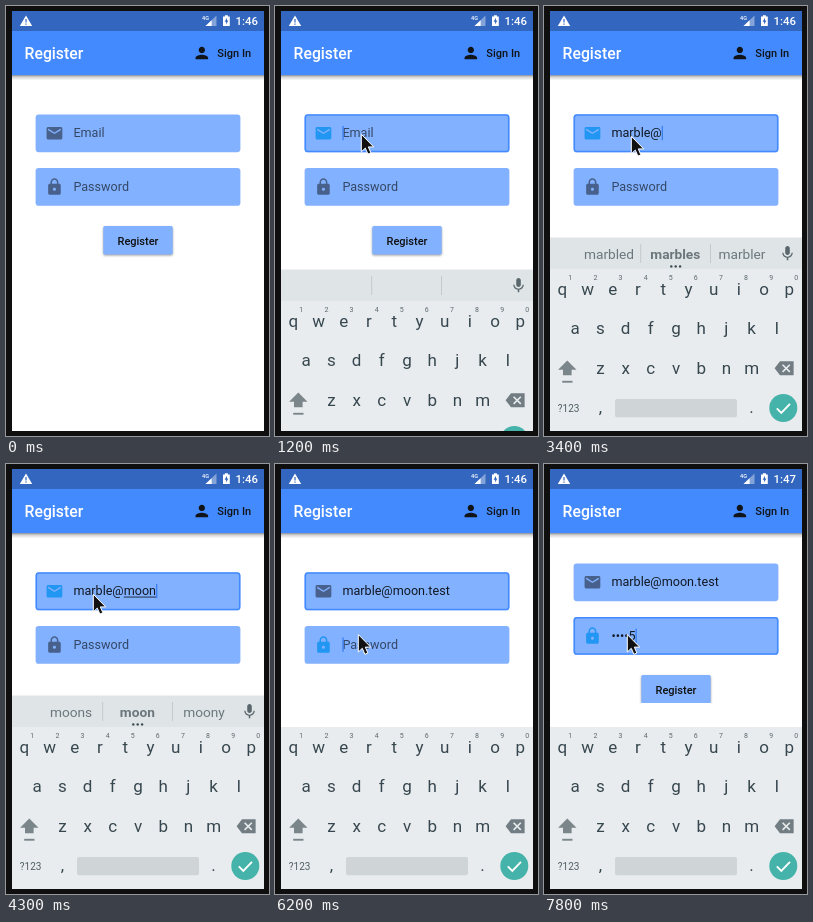
An HTML page for the animation above (8000 ms loop, 263x430 px).

```html
<!DOCTYPE html>
<html lang="en">
<head>
<meta charset="utf-8">
<title>Register form</title>
<style>
html, body { margin: 0; width: 100%; height: 100%; overflow: hidden; background: #100f10; }
svg { display: block; width: 100vw; height: 100vh; font-family: Roboto, "Noto Sans", sans-serif; }
text { white-space: pre; }
.m { font-weight: 500; }
.label { font-size: 12.6px; fill: #000; fill-opacity: .6; }
.typed { font-size: 12.6px; fill: #000; fill-opacity: .87; }
.box { fill: #82b1ff; }
.focus { fill: none; stroke: #448aff; stroke-width: 1.5; }
.caret { fill: #3b7ff0; }
.button { filter: drop-shadow(0 1.3px 1.1px rgba(0,0,0,.38)); }
.key { font-size: 17px; fill: #37474f; text-anchor: middle; }
.digit { font-size: 7px; fill: #5c686e; text-anchor: middle; }
.hint { font-size: 13.7px; fill: #6b777d; text-anchor: middle; }
</style>
</head>
<body>
<svg viewBox="0 0 263 430">
  <defs>
    <clipPath id="screen"><rect x="6" y="5" width="252" height="420"/></clipPath>
    <clipPath id="view"><rect id="viewRect" x="6" y="69" width="252" height="356"/></clipPath>
    <linearGradient id="shade" x2="0" y2="1">
      <stop offset="0" stop-color="#000" stop-opacity=".42"/>
      <stop offset=".4" stop-color="#000" stop-opacity=".16"/>
      <stop offset="1" stop-color="#000" stop-opacity="0"/>
    </linearGradient>
  </defs>
  <rect width="263" height="430" fill="#100f10"/>
  <g clip-path="url(#screen)">
    <rect x="6" y="5" width="252" height="420" fill="#fff"/>

    <g clip-path="url(#view)">
      <g id="form">
        <g id="email" transform="translate(29.6 108.4)"></g>
        <g id="pass" transform="translate(29.6 162)"></g>
        <g class="button">
          <rect class="box" x="97.3" y="220.1" width="69.4" height="28.4" rx="1.6"/>
        </g>
        <text class="m" x="132" y="239" font-size="11.02" text-anchor="middle" fill="#101010">Register</text>
      </g>
    </g>

    <rect x="6" y="69" width="252" height="5.5" fill="url(#shade)"/>
    <rect x="6" y="25" width="252" height="44.1" fill="#448aff"/>
    <rect x="6" y="5" width="252" height="20" fill="#3367bf"/>
    <text class="m" x="18.6" y="53" font-size="15.75" fill="#fff">Register</text>
    <path transform="translate(186.4 37.6) scale(.7875)" fill="#101418" d="M12 12c2.21 0 4-1.79 4-4s-1.79-4-4-4-4 1.79-4 4 1.79 4 4 4zm0 2c-2.67 0-8 1.34-8 4v2h16v-2c0-2.66-5.33-4-8-4z"/>
    <text class="m" x="211.3" y="51.2" font-size="11.02" fill="#101418">Sign In</text>

    <path d="M20 9.5L26.2 20H13.8z" fill="#fff"/>
    <path d="M20 13v3.6M20 17.5v1.3" stroke="#3367bf" stroke-width="1.2"/>
    <text class="m" x="196" y="14.3" font-size="5.6" fill="#fff">4G</text>
    <path d="M210.5 9.5V20H199.5z" fill="#fff" fill-opacity=".4"/>
    <path d="M205.6 14.2V20H199.5z" fill="#fff"/>
    <path d="M217 10.4h1.9V9.2h3v1.2h1.9V20H217z" fill="#fff"/>
    <path d="M221 11.8l-2.4 4h1.5v2.8l2.3-4h-1.4z" fill="#3367bf"/>
    <text id="clock" class="m" x="252" y="19.2" font-size="11.4" fill="#fff" text-anchor="end"></text>

    <g id="board">
      <g id="strip">
        <rect x="6" y="231.5" width="252" height="32" fill="#dfe4e6"/>
        <path d="M96.7 238v19M166.5 238v19" stroke="#c3c9cc" stroke-width="1"/>
        <text class="hint" x="65" y="253"></text>
        <text class="hint" x="131.3" y="253" font-weight="700"></text>
        <text class="hint" x="198" y="253"></text>
        <g id="dots" fill="#37474f">
          <circle cx="127.3" cy="260.4" r="1.2"/><circle cx="131.7" cy="260.4" r="1.2"/><circle cx="136.1" cy="260.4" r="1.2"/>
        </g>
        <path transform="translate(234.4 238.4) scale(.76)" fill="#5a676d" d="M12 14c1.66 0 3-1.34 3-3V5c0-1.66-1.34-3-3-3S9 3.34 9 5v6c0 1.66 1.34 3 3 3zm5.3-3c0 3-2.54 5.1-5.3 5.1S6.700 14 6.700 11H5c0 3.41 2.720 6.230 6 6.720V21h2v-3.280c3.280-.48 6-3.300 6-6.720z"/>
      </g>
      <rect x="6" y="263" width="252" height="170" fill="#e8ecee"/>
      <g id="keys"></g>
      <path d="M23.300 354.600l9.200 9.200h-4.900v5.400h-8.600v-5.400h-4.900z" fill="#7b868b"/>
      <rect x="18.200" y="374.800" width="10.300" height="1.900" fill="#7b868b"/>
      <path d="M230.600 362.300l5.400-7h13.600v14H236z" fill="#717d83"/>
      <path d="M238.600 358.700l7.200 7.200m0-7.200l-7.200 7.200" stroke="#e8ecee" stroke-width="1.600"/>
      <text x="13.800" y="405.600" font-size="10" fill="#4f5d64">?123</text>
      <text class="key" x="56.400" y="407">,</text>
      <rect x="71" y="393" width="122" height="18.200" rx="2" fill="#cfd4d7"/>
      <text class="key" x="207.600" y="407">.</text>
      <circle cx="239.300" cy="402" r="14" fill="#45b3a9"/>
      <path d="M232.800 402.300l4.500 4.500 8.700-9" fill="none" stroke="#fff" stroke-width="1.900"/>
    </g>
  </g>
  <path id="mouse" d="M0 0V17.500L4 13.800 6.600 19.800 9.600 18.500 7 12.600H12.400Z" fill="#111" stroke="#fff" stroke-width="1"/>
</svg>
<script>
const LOOP = 8000;
const ADDRESS = 'marble@moon.test';
const $ = id => document.getElementById(id);
const show = (el, on) => el.setAttribute('display', on ? 'inline' : 'none');

const ICONS = {
  email: 'M20 4H4c-1.1 0-1.99.9-1.99 2L2 18c0 1.1.9 2 2 2h16c1.1 0 2-.9 2-2V6c0-1.1-.9-2-2-2zm0 4l-8 5-8-5V6l8 5 8-5v2z',
  pass: 'M18 8h-1V6c0-2.76-2.24-5-5-5S7 3.24 7 6v2H6c-1.1 0-2 .9-2 2v10c0 1.1.9 2 2 2h12c1.1 0 2-.9 2-2V10c0-1.1-.9-2-2-2zm-6 9c-1.1 0-2-.9-2-2s.9-2 2-2 2 .9 2 2-.9 2-2 2zm3.1-9H8.9V6c0-1.71 1.39-3.1 3.1-3.1 1.71 0 3.1 1.39 3.1 3.1v2z'
};

// Timelines: [start in ms, value]
const emailCount = [[0, 0], [2100, 1], [2300, 2], [2400, 3], [2500, 4], [2600, 5], [2800, 6],
  [3400, 7], [3800, 8], [4100, 9], [4200, 10], [4300, 11], [4500, 12], [4800, 13], [5000, 15], [5100, 16]];
const passCount = [[0, 0], [7000, 1], [7400, 2], [7500, 3], [7600, 4], [7800, 5]];
const hints = [[0, ''], [2200, 'me my more'], [2300, 'may made man'], [2400, 'mark market marry'],
  [2600, 'marble marbles marbled'], [2900, 'marbled marbles marbler'], [3500, ''],
  [3900, 'me my more'], [4200, 'mood moon moor'], [4300, 'moons moon moony'], [4600, ''],
  [5100, 'testing tests tested']];
const mousePath = [[600, [80.5, 125.5]], [700, [86.3, 128.3]], [1700, [87.3, 130.300]],
  [5400, [86.5, 137]], [5500, [85.3, 151]], [5600, [84, 164]], [5700, [83.3, 170.500]]];
const caretResets = [1200, 2900, 6200, 7100].concat(emailCount.slice(1).map(s => s[0]), passCount.slice(1).map(s => s[0]));

function at(steps, t) {
  let value;
  for (const [start, v] of steps) if (t >= start) value = v;
  return value;
}

function makeField(id, label) {
  const g = $(id);
  g.innerHTML = `<rect class="box" width="204.800" height="37.800" rx="3.100"/>
    <rect class="focus" x=".7" y=".7" width="203.400" height="36.400" rx="2.600"/>
    <path class="icon" transform="translate(9.400 9.450) scale(.7875)" d="${ICONS[id]}"/>
    <text class="label" x="37.800" y="22.900">${label}</text>
    <text class="typed" x="37.800" y="22.900"></text>
    <rect class="line" y="24.200" height=".9" fill="#16202f"/>
    <rect class="caret" y="11.500" width="1.300" height="14.300"/>`;
  const part = name => g.querySelector('.' + name);
  return { focus: part('focus'), icon: part('icon'), label: part('label'), typed: part('typed'), line: part('line'), caret: part('caret') };
}

function drawField(f, s) {
  if (f.typed.textContent !== s.text) f.typed.textContent = s.text;
  const width = n => n > 0 ? f.typed.getSubStringLength(0, n) : 0;
  const end = width(s.text.length);
  show(f.focus, s.border);
  show(f.label, s.label);
  show(f.caret, s.caret);
  f.caret.setAttribute('x', 37.8 + end);
  f.icon.setAttribute('fill', s.active ? '#2196f3' : '#47618c');
  show(f.line, s.from >= 0);
  if (s.from >= 0) {
    const start = width(s.from);
    f.line.setAttribute('x', 37.8 + start);
    f.line.setAttribute('width', end - start);
  }
}

function makeKeys() {
  const key = (cls, x, y, c) => `<text class="${cls}" x="${x}" y="${y}">${c}</text>`;
  const rows = [['qwertyuiop', 18.4, 288.6], ['asdfghjkl', 31.2, 328.4], ['zxcvbnm', 56.4, 368.2]];
  let html = rows.map(([row, x, y]) => [...row].map((c, i) => key('key', x + i * 25.2, y, c)).join('')).join('');
  html += [...'1234567890'].map((c, i) => key('digit', 26.3 + i * 25.1, 273.5, c)).join('');
  $('keys').innerHTML = html;
}

// Where the underlined word being composed begins, or -1
function wordStart(n) {
  const start = Math.max(ADDRESS.lastIndexOf('@', n - 1), ADDRESS.lastIndexOf('.', n - 1)) + 1;
  return n > start ? start : -1;
}

makeKeys();
const email = makeField('email', 'Email');
const pass = makeField('pass', 'Password');
const hintTexts = document.querySelectorAll('.hint');

function render(t) {
  const onEmail = t >= 1100 && t < 6200;
  const onPass = t >= 6200;
  const blink = t < 1200 || caretResets.some(r => t >= r && t < r + 500);
  const n = at(emailCount, t);
  const p = at(passCount, t);

  drawField(email, {
    text: ADDRESS.slice(0, n), label: t < 2200, active: onEmail, border: t >= 1200 && t < 6300,
    caret: onEmail && blink, from: onEmail && n ? wordStart(n) : -1
  });
  drawField(pass, {
    text: p ? '•'.repeat(p - 1) + p : '', label: t < 7100, active: onPass, border: t >= 6300,
    caret: onPass && blink, from: -1
  });

  const bottom = t < 1300 ? 425 : t < 6300 ? 207 : 239;
  $('viewRect').setAttribute('height', bottom - 69);
  $('form').setAttribute('transform', `translate(0 ${t >= 6300 ? -9 : 0})`);

  show($('board'), t >= 1200);
  $('board').setAttribute('transform', `translate(0 ${t < 1300 ? 32 : 0})`);
  show($('strip'), t < 6200);
  const words = at(hints, t).split(' ');
  hintTexts.forEach((el, i) => { el.textContent = words[i] || ''; });
  show($('dots'), words[0] !== '');

  $('clock').textContent = t < 7500 ? '1:46' : '1:47';
  const spot = at(mousePath, t);
  show($('mouse'), !!spot);
  if (spot) $('mouse').setAttribute('transform', `translate(${spot})`);
}

const begin = performance.now();
function tick() {
  render((performance.now() - begin) % LOOP);
  requestAnimationFrame(tick);
}
tick();
</script>
</body>
</html>
```
